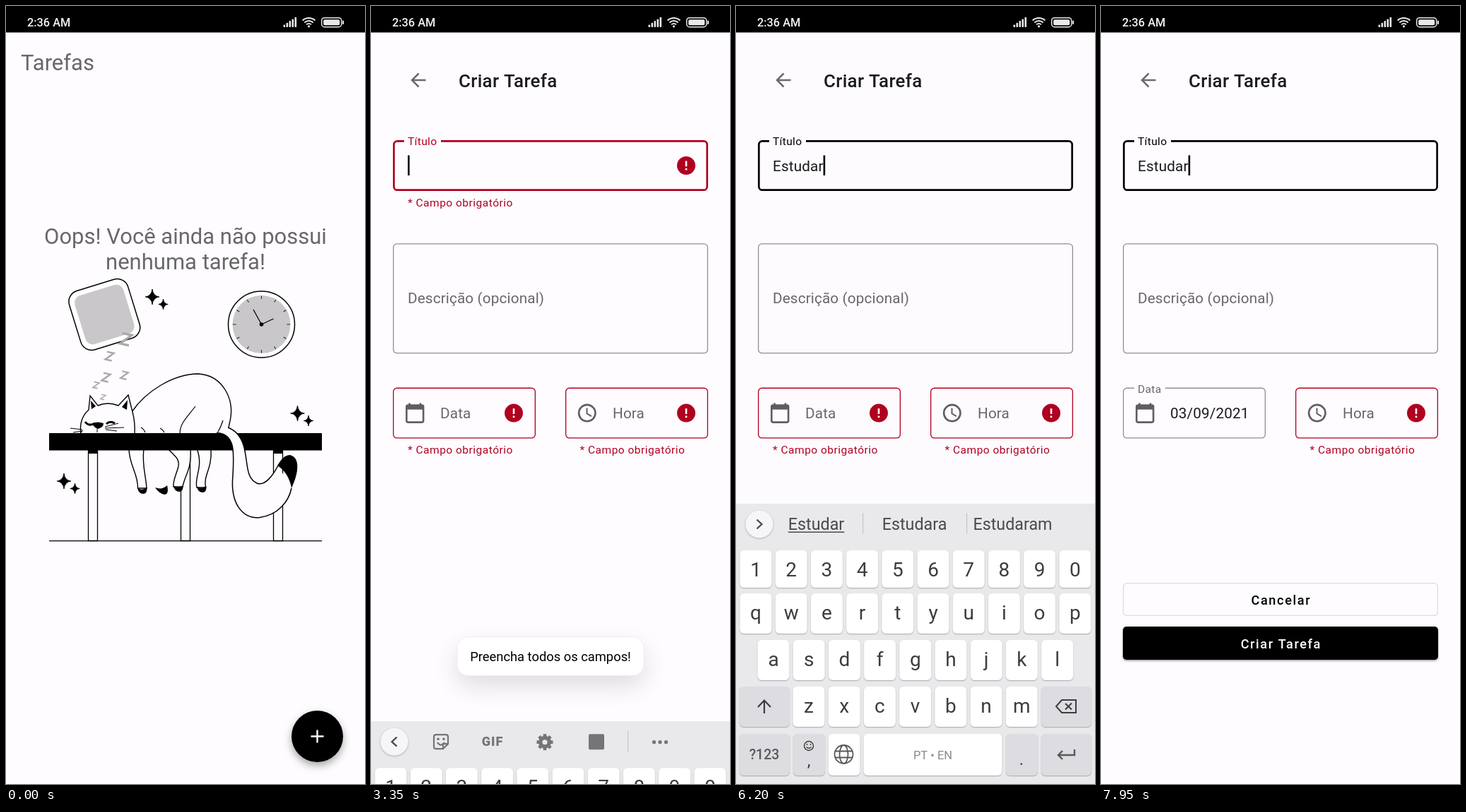
An HTML page with a canvas that plays this animation: 508x1102 px, repeating every 8 s.

```html
<!DOCTYPE html>
<html lang="pt">
<head>
<meta charset="utf-8">
<title>Tarefas</title>
<style>
html, body { margin: 0; width: 100%; height: 100%; overflow: hidden; background: #fefcff; }
canvas { display: block; width: 508px; height: 1102px; }
</style>
</head>
<body>
<script>
const W = 508, H = 1102, LOOP = 8000, dpr = window.devicePixelRatio || 1;
const BG = '#fefcff', INK = '#1b1a1c', GREY = '#69676a', RED = '#b00020';

function layer() {
  const cv = document.createElement('canvas');
  cv.width = W * dpr;
  cv.height = H * dpr;
  const ctx = cv.getContext('2d');
  ctx.scale(dpr, dpr);
  return ctx;
}
const main = layer(), sheet = layer();
document.body.append(main.canvas);
let c = main, t = 0;

// timing
const lin = (start, dur) => Math.min(1, Math.max(0, (t - start) / dur));
const ease = (start, dur) => { const p = lin(start, dur); return p * p * (3 - 2 * p); };
const mix = (a, b, p) => a + (b - a) * p;

// drawing helpers
function txt(s, x, y, size, col, align = 'left', weight = 400, ls = 0) {
  c.font = `${weight} ${size}px Roboto, sans-serif`;
  c.letterSpacing = ls + 'px';
  c.textAlign = align;
  c.fillStyle = col;
  c.fillText(s, align === 'center' ? x + ls / 2 : x, y);
}
function box(x, y, w, h, r, fill, line, lw = 1.3) {
  c.beginPath();
  c.roundRect(x, y, w, h, r);
  if (fill) { c.fillStyle = fill; c.fill(); }
  if (line) { c.strokeStyle = line; c.lineWidth = lw; c.stroke(); }
}
function disc(x, y, r, fill, line, lw = 1.3) {
  c.beginPath();
  c.arc(x, y, r, 0, 7);
  if (fill) { c.fillStyle = fill; c.fill(); }
  if (line) { c.strokeStyle = line; c.lineWidth = lw; c.stroke(); }
}
function path(d, fill, line, lw = 1.4, x = 0, y = 0, rot = 0, scale = 1) {
  c.save();
  c.translate(x, y);
  c.rotate(rot);
  c.scale(scale, scale);
  const p = new Path2D(d);
  if (fill) { c.fillStyle = fill; c.fill(p); }
  if (line) { c.strokeStyle = line; c.lineWidth = lw; c.stroke(p); }
  c.restore();
}
function shaded(blur, dy, col, draw) {
  c.save();
  c.shadowBlur = blur * dpr;
  c.shadowOffsetY = dy * dpr;
  c.shadowColor = col;
  draw();
  c.restore();
}
function faded(a, draw) {
  if (a <= 0) return;
  c.save();
  c.globalAlpha *= a;
  draw();
  c.restore();
}
function ripple(start, dur, clip, x, y, r, col) {
  if (t < start || t > start + dur) return;
  c.save();
  c.beginPath();
  c.roundRect(...clip);
  c.clip();
  c.globalAlpha *= Math.min(1, 2.5 * (1 - lin(start, dur)));
  disc(x, y, mix(r * .3, r, ease(start, dur * .65)), col);
  c.restore();
}
function dim(a) {
  if (a > 0) { c.fillStyle = `rgba(0,0,0,${a})`; c.fillRect(0, 0, W, H); }
}

function statusBar() {
  const col = '#e9e8ea';
  c.fillStyle = '#000';
  c.fillRect(0, 0, W, 37.5);
  txt('2:36 AM', 30, 29, 16.3, '#f4f3f5', 'left', 500);
  for (let i = 0; i < 5; i++) box(392.5 + 4 * i, 26.5 - 2.7 * i, 2.6, 3.5 + 2.7 * i, 1, col);
  c.strokeStyle = col;
  c.lineWidth = 2;
  for (const r of [5, 9, 13]) {
    c.beginPath();
    c.arc(428.5, 30, r, -2.32, -.82);
    c.stroke();
  }
  disc(428.5, 28.8, 1.6, col);
  box(446.7, 16.7, 28, 13, 4, null, col, 1.5);
  box(449.2, 19.2, 23, 8, 2, col);
  box(476, 20.5, 2, 5.5, 1, col);
}

// list screen
function sparkle(x, y, r) {
  const a = r * .9, q = r * .1;
  path(`M0 ${-r}Q${q} ${-q} ${a} 0Q${q} ${q} 0 ${r}Q${-q} ${q} ${-a} 0Q${-q} ${-q} 0 ${-r}Z`, '#000', '#000', .8, x, y);
}
function roundedTile(a, r, fill, line) {
  c.save();
  c.translate(139.3, 437);
  c.rotate(-.3);
  box(-a / 2, -a / 2, a, a, r, fill, line, 1.5);
  c.restore();
}
function wallClock() {
  const x = 361.5, y = 451;
  disc(x, y, 47, '#fff', '#000', 1.5);
  disc(x, y, 41, '#c9c7ca');
  for (let i = 0; i < 12; i++) path('M0 -40.500V-36', null, '#222', 1, x, y, i * Math.PI / 6);
  path('M0 0L-11.500 -21M0 0L17 -8', null, '#000', 1.3, x, y);
  disc(x, y, 2.8, '#000');
}
function cat() {
  const w = BG, k = '#000';
  for (const x of [116.5, 247.5, 378.5]) {
    box(x, 626, 13, 131.5, 0, w, k);
    c.fillStyle = k;
    c.fillRect(x, 628, 13, 6);
  }
  path('M61 757.700H447', null, k, 1.3);
  // hanging legs
  path('M174 627C174 650 187 662 186.500 683L199 683C198 665 192 650 195 627', w, k);
  path('M229 627C238 637 246 641 244 652C241 664 236 672 237 681L250 681C253 664 263 657 261 627', w, k);
  path('M270 627C280 652 266 668 270 682L282.500 682C279 664 292 656 290 627', w, k);
  for (const [x, y] of [[186, 683], [237, 680], [270, 681]])
    path('M0 0Q7 4 13.500 -1Q14 8 8 8Q2 8 0 0Z', k, null, 1, x, y);
  path('M211 682Q221 686 228 679Q231 692 224 692Q216 690 211 682Z', k);
  // body and head
  path('M176 606L178 575C198 545 238 521 272 521C306 523 324 556 317 588Q315 595 314 606', w, k);
  path('M268 567C256 583 246 591 246 606M307 587Q304 597 299 605M191 597Q195 599 197 604M218 598Q222 600 224 604', null, k, 1.2);
  path('M106 606C104 592 108 580 117 572L119 552L130 566Q144 560 159 566L173 551L179 575Q183 590 182 606', w, k);
  path('M120 559L121 571L127 567ZM172 558L164 568L171 572Z', k);
  path('M112 589Q117 596 126 591M142 592Q147 587 154 591', null, k, 3);
  path('M122 591Q130 588 138 591Q138 597 130 599Q124 597 122 591Z', k);
  path('M129 599V604M91 598L108 600M95 604L108 602M104 606L109 601M140 596L159 591M140 598L167 597M141 600L157 602', null, k, 1);
  c.fillStyle = k;
  c.fillRect(61, 605, 386, 24.5);
  // tail
  path('M298 604.500C324 606 323 630 321 665C317 705 335 727 359 724.500C385 721 400 702 404 683L385 651C376 668 365 680 355 676C338 668 343 645 336 622Q330 603 314 597', w);
  path('M298 604.500C324 606 323 630 321 665C317 705 335 727 359 724.500C385 721 400 702 404 683M385 651C376 668 365 680 355 676C338 668 343 645 336 622Q330 603 314 597', null, k, 1.5);
  path('M384 651C390 641 395 636 402 636C417 640 414 662 404 683Q400 661 384 651Z', k);
}
function list() {
  c.fillStyle = BG;
  c.fillRect(0, 0, W, H);
  txt('Tarefas', 21, 91, 31, GREY);
  txt('Oops! Você ainda não possui', 254, 337, 31, GREY, 'center');
  txt('nenhuma tarefa!', 254, 373, 31, GREY, 'center');
  roundedTile(87, 16, '#fff', '#000');
  roundedTile(72, 11, '#c9c7ca');
  wallClock();
  for (const [x, y, s] of [[169, 472, 1.5], [146, 496, 1.1], [141, 526, 1.1], [167, 523, 1], [127, 537, .8], [137, 554, .65]])
    path('M-4 -5H5L-4 5H4.500', null, '#aaa8ab', 2.2, x, y, .22, s);
  cat();
  for (const [x, y] of [[207, 412], [412.5, 577], [82, 673]]) {
    sparkle(x, y, 11);
    sparkle(x + 15.5, y + 10.5, 7.5);
  }
  shaded(12, 5, 'rgba(0,0,0,.35)', () => disc(440.5, 1034.5, 36.5, '#000'));
  ripple(640, 400, [404, 998, 73, 73, 36.5], 440.5, 1034.5, 38, 'rgba(255,255,255,.24)');
  path('M-9 0H9M0 -9V9', null, '#fff', 2.4, 440.5, 1034.5);
}

// form screen
function field(x, y, w, h, label, { inset = 21, lift = 0, red, focus } = {}) {
  const lw = focus ? 2.7 : 1.3, col = red ? RED : focus ? '#000' : '#918f92';
  box(x + lw / 2, y + lw / 2, w - lw, h - lw, 5, null, col, lw);
  const size = mix(20.7, 15.5, lift);
  if (lift > 0) {
    c.fillStyle = BG;
    c.fillRect(x + 16, y - 1, label === 'Data' ? 44 : 52, 5);
  }
  const labelCol = focus ? col : GREY;
  txt(label, x + mix(inset, 21, lift), mix(y + h / 2 + 7, y + 7, lift), size, labelCol, 'left', 400, mix(.15, .35, lift));
}
function alertMark(x, y) {
  disc(x, y, 13, RED);
  c.fillStyle = '#fff';
  c.fillRect(x - 1.3, y - 6.5, 2.6, 7.8);
  c.fillRect(x - 1.3, y + 3.9, 2.6, 2.6);
}
const helper = (x, y) => txt('* Campo obrigatório', x, y, 15.5, RED, 'left', 400, .5);

const PRESS = [4100, 4270, 4430, 4590, 4740, 4900, 5130], WORD = 'Estudar';
const typed = () => WORD.slice(0, PRESS.filter(p => t >= p + 60).length);
const BAD = 2200, FOCUS = 3180, DATE = 7630;
const keyboardUp = () => ease(3250, 330) - ease(6200, 300);

function form() {
  c.fillStyle = BG;
  c.fillRect(0, 0, W, H);
  path('M10 0H-9M0 -9.500L-9.500 0L0 9.500', null, '#6c6a6d', 2.5, 67.5, 105);
  txt('Criar Tarefa', 124, 115, 25.9, INK, 'left', 500, .32);

  const bad = t >= BAD, s = typed(), dated = t >= DATE, show = lin(BAD, 170);
  const titleBad = bad && !s, dy = bad ? 26.3 : 0, y = 514.3 + dy;
  field(31, 190, 446, 72, 'Título', { lift: ease(FOCUS, 167), red: titleBad, focus: t >= FOCUS });
  field(31, 310 + dy, 446, 156, 'Descrição (opcional)');
  field(31, y, 202, 72, 'Data', { inset: 67, lift: ease(DATE, 167), red: bad && !dated });
  field(275, y, 202, 72, 'Hora', { inset: 67, red: bad });

  const iconCol = '#5f5d60', iy = y + 36;
  box(50.3, iy - 11, 23.8, 24, 2, null, iconCol, 2.6);
  c.fillStyle = iconCol;
  c.fillRect(50, iy - 11, 24.4, 6);
  c.fillRect(53.2, iy - 14.2, 2.6, 4);
  c.fillRect(68.6, iy - 14.2, 2.6, 4);
  disc(305.8, iy, 11.7, null, iconCol, 2.6);
  path('M-.300 -7V.700L6 4.500', null, iconCol, 2, 305.8, iy);

  faded(show, () => {
    if (titleBad) { alertMark(446, 226); helper(52, 283.5); }
    if (!dated) alertMark(202, iy);
    alertMark(446, iy);
    helper(295.5, y + 93.5);
    faded(1 - lin(DATE, 167), () => helper(52, y + 93.5));
  });
  if (dated) txt('03/09/2021', 98, iy + 7.5, 20.7, INK, 'left', 400, .15);

  if (s) {
    txt(s, 52, 234, 20.7, INK, 'left', 400, .15);
    if (t < 6200) {
      c.fillStyle = INK;
      c.fillRect(52, 236, c.measureText(s).width, 1.2);
    }
  }
  const blink = (t > 3720 && t < 4100) || (t >= 5700 && t < 6150);
  if (t >= FOCUS && !blink) {
    c.font = '400 20.7px Roboto, sans-serif';
    c.letterSpacing = '.15px';
    c.fillStyle = '#000';
    c.fillRect(52 + c.measureText(s).width, 211.5, 2.6, 28.5);
  }
  if (t < 3260 || t > 6200) {
    const by = bad ? 52 : 0;
    box(31.6, 765.6 + by, 444.8, 45.8, 5, null, '#dddbde');
    txt('Cancelar', 254, 795.5 + by, 18.1, '#000', 'center', 500, 1.62);
    shaded(3, 1.5, 'rgba(0,0,0,.4)', () => box(31, 827 + by, 446, 47, 5, '#000'));
    ripple(2050, 420, [31, 827 + by, 446, 47, 5], 254, 850 + by, 240, 'rgba(255,255,255,.24)');
    txt('Criar Tarefa', 254, 857.5 + by, 18.1, '#fff', 'center', 500, 1.62);
  }
}

function toast() {
  faded(lin(2250, 250) - lin(3650, 200), () => {
    shaded(34, 14, 'rgba(0,0,0,.13)', () => box(122, 893.5, 264, 55, 15, '#fff'));
    box(122, 893.5, 264, 55, 15, '#fff', '#efedf0', 1);
    txt('Preencha todos os campos!', 254, 928, 18.35, '#000', 'center');
  });
}

// keyboard
const ROWS = ['1234567890', 'qwertyuiop', 'asdfghjkl', 'zxcvbnm'];
const ROW_Y = [771, 832, 898, 964], ROW_X = [28, 28, 53, 103], STEP = 50.2;
const KEY = '#3d3c3f', ICON = '#757477';
const HINTS = [['Eu', 'Ele'], ['Esse', 'Esta'], ['Está', 'Este'], ['Estudo', 'Estudar'],
  ['Estudo', 'Estudar'], ['Estudar', 'Estudando'], ['Estudara', 'Estudaram']];

function key(x, y, w, h, fill = '#fff') {
  shaded(1.5, 1, 'rgba(0,0,0,.28)', () => box(x, y, w, h, 6, fill));
}
function strip(s) {
  shaded(3, 1, 'rgba(0,0,0,.25)', () => disc(33, 734, 19.5, '#f6f5f7'));
  const back = s ? 'M-3.500 -6.500L3.500 0L-3.500 6.500' : 'M3.500 -6.500L-3.500 0L3.500 6.500';
  path(back, null, '#4c4b4e', 2.3, 33, 734);
  c.fillStyle = '#c6c5c8';
  if (s) {
    c.fillRect(179, 718, 1.2, 30);
    c.fillRect(326, 718, 1.2, 30);
    [s, ...HINTS[s.length - 1]].forEach((word, i) =>
      txt(word, [113.5, 252.5, 391.5][i], 742, 23.3, '#4a494c', 'center'));
    c.font = '400 23.3px Roboto, sans-serif';
    const w = c.measureText(s).width;
    c.fillRect(113.5 - w / 2, 744.5, w, 1.5);
    return;
  }
  c.fillRect(363, 719, 1.2, 30);
  path('M-7 -10H7Q10 -10 10 -7V3L3 10H-7Q-10 10 -10 7V-7Q-10 -10 -7 -10ZM-5 1Q0 8 5 1M10 3H3V10', null, ICON, 2.2, 99, 734);
  disc(95, 730, 1.8, ICON);
  disc(103, 730, 1.8, ICON);
  txt('GIF', 171.5, 740, 18, ICON, 'center', 900, 1);
  disc(246, 734.5, 6.3, null, ICON, 5.5);
  for (let i = 0; i < 8; i++) path('M-2.300 -11.500H2.300V-7H-2.300Z', ICON, null, 1, 246, 734.5, i * Math.PI / 4);
  box(308, 723, 22, 22, 2, ICON);
  for (const x of [400.5, 409, 417.5]) disc(x, 734.5, 2.6, ICON);
}
function keyboard() {
  const up = keyboardUp();
  if (up <= 0) return;
  const s = typed(), caps = !s, dark = '#dddce0';
  c.save();
  c.translate(0, 397 * (1 - up));
  c.fillStyle = '#e9e8eb';
  c.fillRect(0, 705, W, H);
  strip(s);
  const show = ch => caps ? ch.toUpperCase() : ch;
  ROWS.forEach((row, r) => [...row].forEach((ch, i) => {
    const x = ROW_X[r] + STEP * i, y = ROW_Y[r], h = r ? 57 : 53;
    key(x - 22.5, y, 45, h);
    txt(show(ch), x, y + (r ? 36.5 : 37), 28, KEY, 'center');
  }));
  key(5, 964, 71, 57, dark);
  path('M0 10V-8M-9 1L0 -8.500L9 1', caps ? KEY : null, KEY, 2.2, 40, 992);
  key(432, 964, 71, 57, dark);
  path('M-6 -9H14V9H-6L-14 0ZM-1 -4L8 4.500M8 -4.500L-1 4.500', null, KEY, 2, 467, 992);
  key(5, 1031, 71, 59, dark);
  txt('?123', 40, 1067, 19.5, '#59585b', 'center', 500);
  key(81, 1031, 45, 59, dark);
  disc(103, 1048, 6.5, null, KEY, 1.4);
  path('M-3.500 1.500Q0 5 3.500 1.500M-2.500 -3V-1M2.500 -3V-1', null, KEY, 1.4, 103, 1048);
  txt(',', 103, 1077, 24, KEY, 'center');
  key(130.5, 1031, 45, 59);
  path('M-13 0A13 13 0 1 0 13 0A13 13 0 1 0 -13 0M-6 0A6 13 0 1 0 6 0A6 13 0 1 0 -6 0M-12 -4.500H12M-12 4.500H12', null, '#59585b', 1.8, 152.5, 1060);
  key(180.5, 1031, 196, 59);
  txt('PT • EN', 278.5, 1066.5, 16.5, '#8b8a8d', 'center');
  key(382, 1031, 45, 59, dark);
  txt('.', 404, 1075, 24, KEY, 'center');
  key(432, 1031, 71, 59, dark);
  path('M12 -7V1H-11M-5 -5L-11 1L-5 7', null, '#59585b', 2.4, 467, 1060);

  const n = PRESS.findIndex(p => t >= p && t < p + 110);
  if (n >= 0) {
    const ch = WORD[n], r = ROWS.findIndex(row => row.includes(ch.toLowerCase()));
    const x = ROW_X[r] + STEP * ROWS[r].indexOf(ch.toLowerCase()), y = ROW_Y[r];
    shaded(5, 2, 'rgba(0,0,0,.3)', () => box(x - 25, y - 92, 50, 149, 6, '#fff'));
    txt(ch, x - 1, y - 44, 31, KEY, 'center');
  }
  c.restore();
}

// date picker
function picker() {
  const picked = t >= 7130;
  box(42, 238, 424, 663, 5, BG);
  box(42, 238, 424, 156, [5, 5, 0, 0], '#000');
  txt('SELECT DATE', 73.5, 274.5, 12.95, '#fff', 'left', 400, 2.4);
  txt(picked ? 'Sep 3, 2021' : 'Selected date', 73, 368, 44, '#fff', 'left', 400, .32);
  path('M-12 7.200V12H-7.200L7.300 -2.500L2.500 -7.300ZM8.600 -3.800L11.300 -6.500Q12.500 -7.700 11.300 -8.800L8.800 -11.300Q7.600 -12.500 6.400 -11.300L3.800 -8.600Z', '#fff', null, 1, 419.5, 352.5);
  txt('SEPTEMBER 2021', 68, 437, 18.1, GREY, 'left', 500, 1.62);
  path('M-6.500 -3H6.500L0 3.500Z', GREY, null, 1, 259, 430.5);
  path('M4 -7L-3 0L4 7', null, GREY, 2.6, 352, 430);
  path('M-3 -7L4 0L-3 7', null, GREY, 2.6, 413.5, 430);
  const cx = i => 83 + 56.9 * i;
  [...'SMTWTFS'].forEach((d, i) => txt(d, cx(i), 499.5, 18.1, INK, 'center'));
  disc(cx(4), 544, 22.8, null, '#000', 1.4);
  ripple(7040, 280, [cx(5) - 23, 521, 46, 46, 23], cx(5), 544, 23, 'rgba(0,0,0,.15)');
  if (picked) disc(cx(5), 544, 23.5, '#000');
  for (let d = 1; d <= 30; d++) {
    const col = d === 1 ? '#a3a1a4' : d === 3 && picked ? '#fff' : INK;
    txt(d, cx((d + 2) % 7), 550.3 + 51.75 * Math.floor((d + 2) / 7), 15.5, col, 'center', 400, .5);
  }
  ripple(7490, 480, [382, 844, 74, 47, 5], 430, 867, 50, 'rgba(0,0,0,.13)');
  txt('CANCEL', 276, 874.5, 18.1, '#000', 'left', 500, 1.62);
  txt('OK', 401, 874.5, 18.1, picked ? '#000' : '#9d9b9e', 'left', 500, 1.62);
}
function dialog() {
  dim(.6 * (lin(6200, 250) - lin(7600, 300)));
  const a = lin(6250, 220) - lin(7600, 180);
  if (a <= 0) return;
  c = sheet;
  c.clearRect(0, 0, W, H);
  picker();
  c = main;
  faded(a, () => c.drawImage(sheet.canvas, 0, 0, W, H));
}

function frame(now) {
  t = now % LOOP;
  const slide = 1 - (1 - lin(950, 700)) ** 4;
  if (slide < 1) {
    c.save();
    c.translate(-W / 4 * slide, 0);
    list();
    c.restore();
    dim(.5 * slide);
  }
  if (slide > 0) {
    c.save();
    c.translate(W * (1 - slide), 0);
    form();
    c.restore();
  }
  dialog();
  keyboard();
  toast();
  statusBar();
  requestAnimationFrame(frame);
}
requestAnimationFrame(frame);
</script>
</body>
</html>
```
